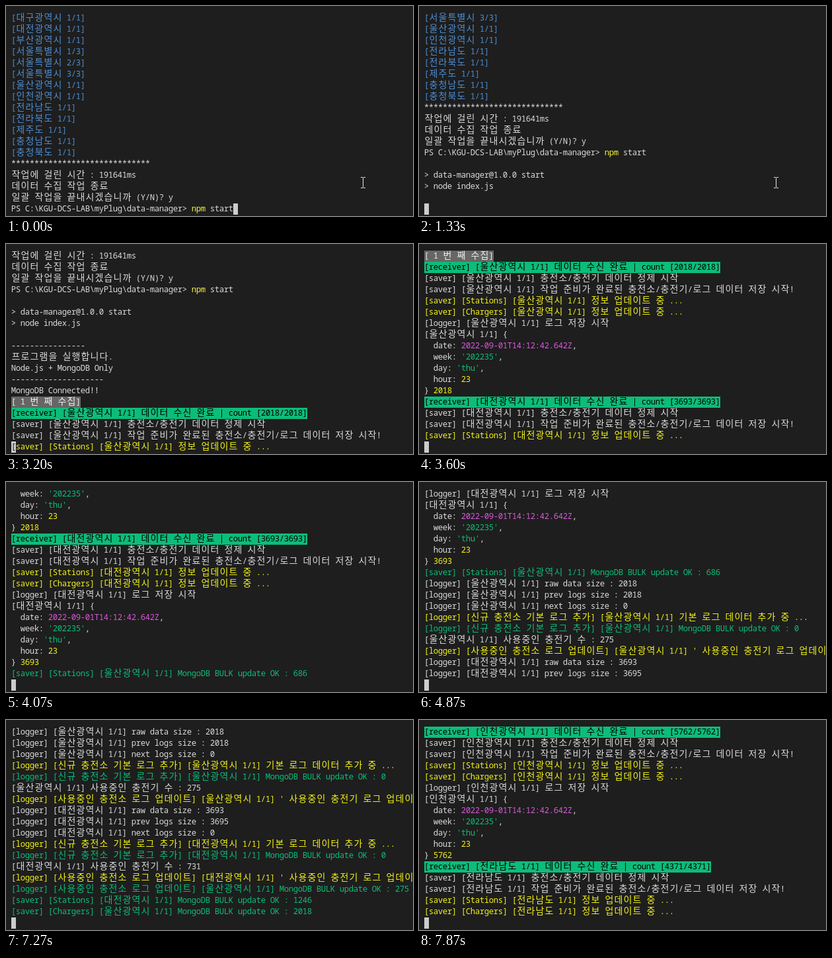
Recreate the animation shown at these times as an HTML page with a canvas. Size 616 px wide and 318 px high, loop 8 s.

```html
<!DOCTYPE html>
<html lang="ko">
<head>
<meta charset="utf-8">
<title>Terminal log</title>
<style>
  html, body { margin: 0; width: 100%; height: 100%; overflow: hidden; background: #1e1e1e; }
  canvas { display: block; width: 616px; height: 318px; }
</style>
</head>
<body>
<canvas id="screen" width="616" height="318"></canvas>
<script>
const LOOP = 8000, ROWS = 18, LEFT = 8, TOP = 10, CELL = 7, LINE = 17;
const LATIN = '500 12.3px "Noto Sans Mono", "DejaVu Sans Mono", monospace';
const HANGUL = '300 14px "Noto Sans CJK KR", "Noto Sans CJK", sans-serif';
const BACK = '#1e1e1e', CURSOR = '#cccccc', FORE = '#dadada', BLUE = '#4e8ed3', GREEN = '#0dbc79',
      YELLOW = '#f2f21a', MAGENTA = '#d957d9', GRAY = '#666666', WHITE = '#f0f0f0';

// A line is a list of spans: [text, color, background]
const line = (text, color = FORE, back) => [[text, color, back]];
const field = (name, value, color, end = ',') =>
  [[`  ${name}: `, FORE], [value, color], [end, FORE]];

const received = (city, count) => [
  line(`[receiver] [${city} 1/1] 데이터 수신 완료 | count [${count}/${count}]`, '#000000', GREEN),
  line(`[saver] [${city} 1/1] 충전소/충전기 데이터 정제 시작`),
  line(`[saver] [${city} 1/1] 작업 준비가 완료된 충전소/충전기/로그 데이터 저장 시작!`),
  ...['Stations', 'Chargers'].map(kind =>
    line(`[saver] [${kind}] [${city} 1/1] 정보 업데이트 중 ...`, YELLOW))
];
const logged = (city, count) => [
  line(`[logger] [${city} 1/1] 로그 저장 시작`),
  line(`[${city} 1/1] {`),
  field('date', '2022-09-01T14:12:42.642Z', MAGENTA),
  field('week', "'202235'", GREEN),
  field('day', "'thu'", GREEN),
  field('hour', '23', YELLOW, ''),
  [['} ', FORE], [String(count), YELLOW]]
];
const saved = (label, city, count) =>
  line(`${label} [${city} 1/1] MongoDB BULK update OK : ${count}`, GREEN);
const updated = (city, raw, prev, used) => [
  ...[['raw data', raw], ['prev logs', prev], ['next logs', 0]].map(([name, size]) =>
    line(`[logger] [${city} 1/1] ${name} size : ${size}`)),
  line(`[logger] [신규 충전소 기본 로그 추가] [${city} 1/1] 기본 로그 데이터 추가 중 ...`, YELLOW),
  saved('[logger] [신규 충전소 기본 로그 추가]', city, 0),
  line(`[${city} 1/1] 사용중인 충전기 수 : ${used}`),
  line(`[logger] [사용중인 충전소 로그 업데이트] [${city} 1/1] ' 사용중인 충전기 로그 업데이트 중 ...`, YELLOW)
];

const ULSAN = '울산광역시', DAEJEON = '대전광역시', INCHEON = '인천광역시', JEONNAM = '전라남도';
const regions = ['대구광역시 1/1', '대전광역시 1/1', '부산광역시 1/1', '서울특별시 1/3',
  '서울특별시 2/3', '서울특별시 3/3', '울산광역시 1/1', '인천광역시 1/1', '전라남도 1/1',
  '전라북도 1/1', '제주도 1/1', '충청남도 1/1', '충청북도 1/1'];

const log = [
  ...regions.map(name => line(`[${name}]`, BLUE)),
  line('*'.repeat(30)),
  line('작업에 걸린 시간 : 191641ms'),
  line('데이터 수집 작업 종료'),
  line('일괄 작업을 끝내시겠습니까 (Y/N)? y'),
  [['PS C:\\KGU-DCS-LAB\\myPlug\\data-manager> ', FORE], ['npm', '#f5f543'], [' start', FORE]],
  line(''),
  line('> data-manager@1.0.0 start'),
  line('> node index.js'),
  line(''),
  line('-'.repeat(16)),
  line('프로그램을 실행합니다.'),
  line('Node.js + MongoDB Only'),
  line('-'.repeat(20)),
  line('MongoDB Connected!!'),
  line('[ 1 번 째 수집]', WHITE, GRAY),
  ...received(ULSAN, 2018),
  ...logged(ULSAN, 2018),
  ...received(DAEJEON, 3693),
  ...logged(DAEJEON, 3693),
  saved('[saver] [Stations]', ULSAN, 686),
  ...updated(ULSAN, 2018, 2018, 275),
  ...updated(DAEJEON, 3693, 3695, 731),
  saved('[logger] [사용중인 충전소 로그 업데이트]', ULSAN, 275),
  saved('[saver] [Stations]', DAEJEON, 1246),
  saved('[saver] [Chargers]', ULSAN, 2018),
  ...received(INCHEON, 5762),
  ...logged(INCHEON, 5762),
  ...received(JEONNAM, 4371)
];

// [time, line of the cursor, cursor column if that line is already written]
const steps = [
  [0, 17, 48], [470, 18], [1330, 22], [1930, 26], [2070, 27], [2200, 28],
  [3200, 31, 0], [3270, 32], [3330, 33], [3470, 40], [3530, 42, 0], [3600, 44], [3670, 45],
  [3870, 46], [3930, 52], [4070, 53], [4670, 56, 0], [4730, 60], [4870, 62],
  [7000, 67], [7070, 68], [7130, 69], [7200, 70], [7330, 73], [7400, 75],
  [7670, 82], [7730, 86], [7870, 87]
];
// [time, x, y] of the pointer's centre
const pointer = [[0, 540, 267], [2070, 546, 285], [2130, 554, 311], [2200]];

const ctx = document.getElementById('screen').getContext('2d', { alpha: false });
const at = (table, time) => table.findLast(step => step[0] <= time);
const isWide = char => /[가-힣]/.test(char);
const cells = char => isWide(char) ? 2 : 1;

function fillCells(col, row, count, color) {
  ctx.fillStyle = color;
  ctx.fillRect(LEFT + col * CELL, TOP + row * LINE, count * CELL, LINE);
}

// Each glyph sits in the middle of its cell or pair of cells.
function drawChar(char, col, row, color) {
  ctx.font = isWide(char) ? HANGUL : LATIN;
  ctx.textAlign = 'center';
  ctx.fillStyle = color;
  ctx.fillText(char, LEFT + (col + cells(char) / 2) * CELL, TOP + row * LINE + 12);
}

function drawLine(spans, row) {
  let col = 0;
  for (const [text, color, back] of spans) {
    const chars = [...text];
    const width = chars.reduce((sum, char) => sum + cells(char), 0);
    if (back) fillCells(col, row, width, back);
    for (const char of chars) {
      drawChar(char, col, row, color);
      col += cells(char);
    }
  }
}

function drawPointer(x, y) {
  ctx.fillStyle = '#e8e8e8';
  ctx.fillRect(x, y - 7, 1, 15);
  for (const end of [y - 8, y + 8]) {
    ctx.fillRect(x - 3, end, 3, 1);
    ctx.fillRect(x + 1, end, 3, 1);
  }
}

function draw(time) {
  const [, cursor, col] = at(steps, time);
  const first = cursor - ROWS + 1, written = col !== undefined;
  ctx.fillStyle = BACK;
  ctx.fillRect(0, 0, 616, 318);
  for (let row = 0; row < ROWS; row++) {
    if (row < ROWS - 1 || written) drawLine(log[first + row], row);
  }
  fillCells(col || 0, ROWS - 1, 1, CURSOR);
  if (col === 0) drawChar('[', 0, ROWS - 1, BACK);
  const [, x, y] = at(pointer, time);
  if (x) drawPointer(x, y);
}

const start = performance.now();
function tick() {
  draw((performance.now() - start) % LOOP);
  requestAnimationFrame(tick);
}
tick();
</script>
</body>
</html>
```
